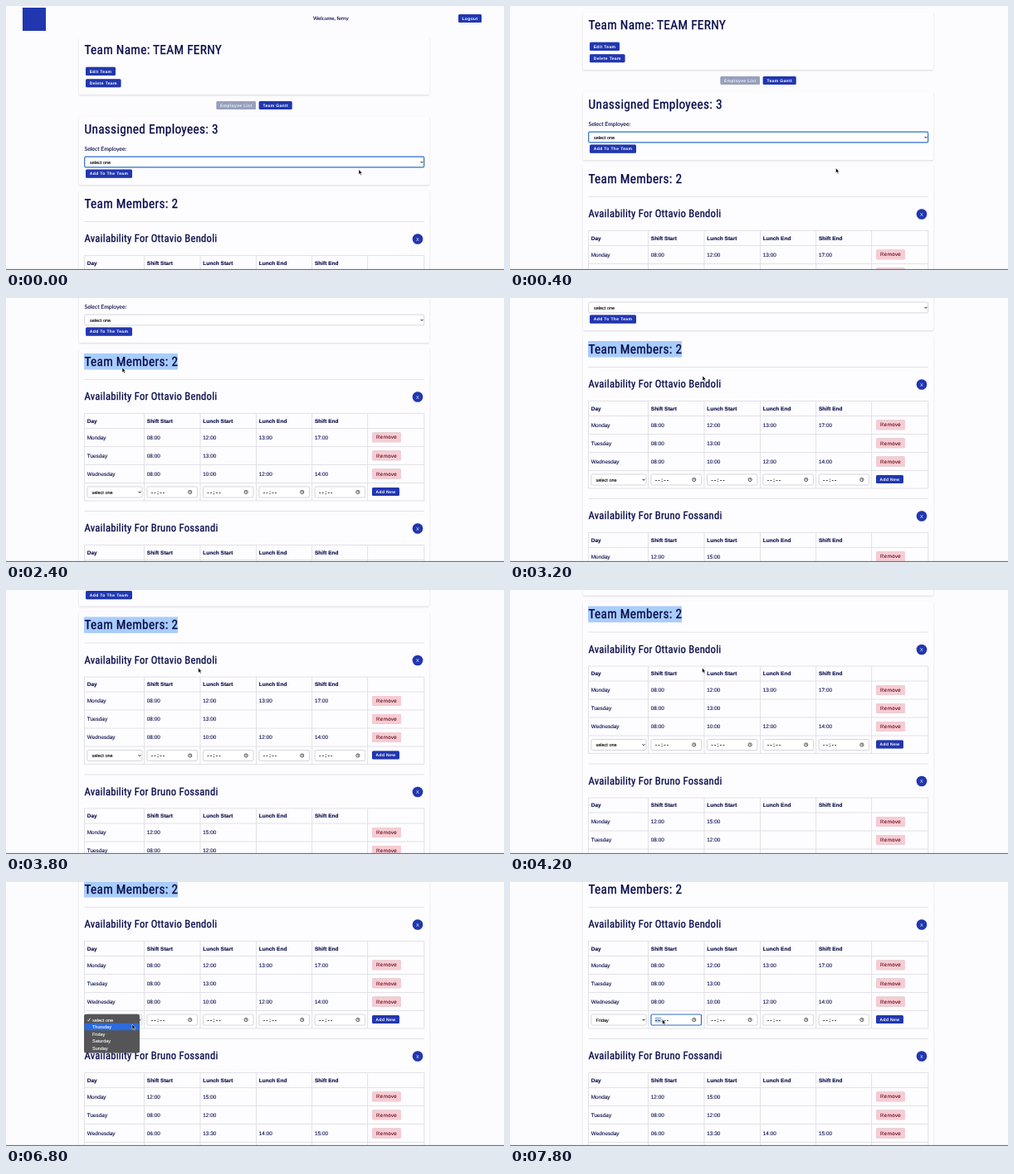
Recreate the animation shown at these times as an HTML page. Size 600 by 319 pixels, loop 8 s.

```html
<!DOCTYPE html>
<html lang="en">
<head>
<meta charset="utf-8">
<title>Team availability</title>
<style>
  html, body { margin: 0; width: 100%; height: 100%; overflow: hidden; background: #fcfbfe; }
  svg { display: block; width: 100%; height: 100%; }
  text { font-family: "Liberation Sans", Arial, sans-serif; fill: #060a48; stroke: #060a48; stroke-width: .1; text-rendering: geometricPrecision; white-space: pre; }
  .big, .mid { font-family: "Roboto Condensed", Roboto, sans-serif; font-stretch: condensed; letter-spacing: .018em; stroke-width: .28; }
  .big { font-size: 15.4px; }
  .mid { font-size: 12.7px; }
  .soft { font-family: Lato, sans-serif; font-size: 6.2px; }
  .head { font-size: 6.5px; font-weight: bold; }
  .cell { font-size: 6.4px; }
  .field { font-size: 5.5px; fill: #000; stroke: #000; stroke-width: .12; }
  .time { font-size: 6px; fill: #000; stroke: #000; stroke-width: .3; letter-spacing: 1.6px; }
  .btn { font-size: 5px; font-weight: bold; letter-spacing: .35px; fill: #fff; stroke: none; text-anchor: middle; }
  .remove { font-size: 6.2px; letter-spacing: .35px; fill: #6a1024; stroke: #6a1024; text-anchor: middle; }
  .menu { font-size: 5.5px; fill: #fff; stroke: #fff; }
  .card { fill: #fdfcff; filter: drop-shadow(0 1px .9px #0002); }
  .raised { filter: drop-shadow(0 .6px .7px #0004); }
  .rule { stroke: #dfdfe5; stroke-width: .9; fill: none; }
  .box { fill: #fff; stroke: #b9bdc9; stroke-width: .6; }
  .focus { stroke: #2f6fca; stroke-width: 1.2; }
  .line { fill: none; stroke: #111; stroke-width: 1; }
</style>
</head>
<body>
<script>
const BLUE = '#2137b0';
const COLUMNS = [94.5, 166.5, 234, 301.5, 368.7, 435.6, 503.8];
const TABLE_STEP = 159;

const text = (x, y, cls, str, extra = '') => `<text x="${x}" y="${y}" class="${cls}" ${extra}>${str}</text>`;
const rect = (x, y, w, h, attrs, r = 0) => `<rect x="${x}" y="${y}" width="${w}" height="${h}" rx="${r}" ${attrs}/>`;
const path = (d, cls) => `<path d="${d}" class="${cls}"/>`;
const rule = y => path(`M94.5 ${y}H504`, 'rule');
const chevron = (x, y) => path(`M${x - 1.5} ${y - .7}l1.5 1.5l1.5 -1.5`, 'line');
const card = (y, h) => rect(88, y, 422, h, 'class="card"', 1.5);

function button(x, y, w, label, fill = BLUE, ink = '#fff') {
  return rect(x, y, w, 10.1, `fill="${fill}" class="raised"`, 1.5) +
    text(x + w / 2, y + 6.8, 'btn', label, `style="fill:${ink}"`);
}

function timeField(x, y, editable) {
  return rect(x, y - 6.5, 60.5, 13, `class="box" ${editable ? 'id="timeBox"' : ''}`, 1.5) +
    (editable ? rect(x + 4.7, y - 3.4, 7.2, 6.6, 'fill="#a9cdfb" id="timeMark"') : '') +
    text(x + 5, y + 2, 'time', '--:--') +
    `<circle cx="${x + 51.7}" cy="${y}" r="2.1" class="line" style="stroke-width:.7"/>` +
    `<path d="M${x + 51.7} ${y - 1.2}v1.3h1" class="line" style="stroke-width:.6"/>`;
}

function availability(name, rows, offset, live) {
  const top = 301.5 + offset, bottom = 407 + offset;
  const lines = [301.5, 319.5, 341.5, 363.5, 385.5, 407].map(y => rule(y + offset)).join('');
  const posts = COLUMNS.map(x => path(`M${x} ${top}V${bottom}`, 'rule')).join('');
  const heads = ['Day', 'Shift Start', 'Lunch Start', 'Lunch End', 'Shift End']
    .map((label, i) => text(COLUMNS[i] + 3.3, 312.7 + offset, 'head', label)).join('');
  const cells = rows.map((row, r) => {
    const y = 330.2 + 22.1 * r + offset;
    return row.map((value, i) => text(COLUMNS[i] + 3.3, y + 2.3, 'cell', value)).join('') +
      rect(441, y - 5.8, 35, 11.8, 'fill="#f6ccd3" class="raised"', 1.5) +
      text(458.6, y + 2.2, 'remove', 'Remove');
  }).join('');
  const y = 396.5 + offset;
  return rule(260.5 + offset) + text(94.5, 285.4 + offset, 'mid', `Availability For ${name}`) +
    `<circle cx="496" cy="${281.5 + offset}" r="6.3" fill="${BLUE}" class="raised"/>` +
    text(496, 283.5 + offset, 'btn', 'X', 'style="font-weight:400;font-size:5.6px"') +
    lines + posts + heads + cells +
    rect(98, y - 6.5, 66, 13, 'class="box"', 1.5) +
    text(103.5, y + 2, 'field', 'select one', live ? 'id="day"' : '') + chevron(161, y) +
    [1, 2, 3, 4].map(i => timeField(COLUMNS[i] + 3.5, y, live && i === 1)).join('') +
    button(441, y - 5.5, 33, 'Add New');
}

const page =
  rect(20, 2, 28, 28, `fill="${BLUE}"`) +
  text(370, 17.2, 'soft', 'Welcome, ferny') + button(545, 10, 28, 'Logout') +
  card(38, 69) + text(94.5, 58.3, 'big', 'Team Name: TEAM FERNY') +
  button(96, 73.8, 36, 'Edit Team') + button(96, 88.2, 42.5, 'Delete Team') +
  button(253.5, 115, 47.5, 'Employee List', '#97a0bd', '#e9ebf4') + button(304.7, 115, 40, 'Team Gantt') +
  card(134, 82) + text(94.5, 154.3, 'big', 'Unassigned Employees: 3') +
  text(94.5, 175.3, 'soft', 'Select Employee:', 'style="font-size:6.8px"') +
  rect(94.7, 182.1, 409, 12.8, 'id="employee" class="box"', 1.5) +
  text(101, 190.6, 'field', 'select one') + chevron(501, 188.6) +
  button(96, 197.6, 56, 'Add To The Team') +
  card(223, 420) + rect(94, 229, 113, 19.6, 'fill="#a9cdfb" id="marked"') +
  text(94.5, 243.7, 'big', 'Team Members: 2') +
  availability('Ottavio Bendoli', [
    ['Monday', '08:00', '12:00', '13:00', '17:00'],
    ['Tuesday', '08:00', '13:00'],
    ['Wednesday', '08:00', '10:00', '12:00', '14:00']], 0, true) +
  availability('Bruno Fossandi', [
    ['Monday', '12:00', '15:00'],
    ['Tuesday', '08:00', '12:00'],
    ['Wednesday', '06:00', '13:30', '14:00', '15:00']], TABLE_STEP, false);

const menu = rect(94, 159.7, 67, 46.8, 'fill="#555558" class="raised"', 2.5) +
  rect(94.6, 0, 65.8, 8.5, 'fill="#2c6be0" id="hover"') +
  '<path d="M98.3 166.6l1.2 1.5l2 -3.6" class="line" style="stroke:#fff;stroke-width:.8"/>' +
  ['select one', 'Thursday', 'Friday', 'Saturday', 'Sunday']
    .map((label, i) => text(104, 168.5 + 8.5 * i, 'menu', label)).join('');

document.body.innerHTML = `<svg viewBox="0 0 600 319">
  <rect width="600" height="319" fill="#fcfbfe"/>
  <g id="page">${page}</g>
  <g id="menu">${menu}</g>
  <rect y="317.9" width="600" height="1.1" fill="#6f6f76"/>
  <path id="cursor" d="M0 0V6L1.4 4.8L2.4 7L3.4 6.5L2.4 4.4H4.2Z" fill="#000" stroke="#fff" stroke-width=".5"/>
</svg>`;

const $ = id => document.getElementById(id);
const show = (id, on) => $(id).setAttribute('visibility', on ? 'visible' : 'hidden');

const scrollKeys = [[200, 0], [400, 30], [600, 90], [800, 140], [1000, 161.5], [1400, 162],
  [2600, 162], [3200, 177], [3600, 190], [4200, 209.5], [4800, 230]];
const cursorKeys = [[200, 425, 197.5], [600, 360, 194], [1000, 321.5, 190], [1400, 270, 130],
  [1600, 207, 78], [2200, 90, 78], [2600, 190, 90], [3200, 232, 94], [4200, 231.5, 94],
  [4800, 234, 104.5], [5200, 225, 120], [5800, 160, 164], [6400, 158, 164], [6800, 152, 172],
  [7000, 145, 181], [7200, 143, 181], [7400, 145, 180], [7600, 172, 167], [7800, 183.5, 166]];

function along(keys, t) {
  const next = keys.findIndex(key => key[0] > t);
  if (next < 0) return keys.at(-1).slice(1);
  if (next === 0) return keys[0].slice(1);
  const a = keys[next - 1], b = keys[next], k = (t - a[0]) / (b[0] - a[0]);
  return a.slice(1).map((v, i) => v + (b[i + 1] - v) * k);
}

function draw(now) {
  const t = Math.floor(now % 8000 / 200) * 200;
  const [scroll] = along(scrollKeys, t);
  const [x, y] = along(cursorKeys, t);
  $('page').setAttribute('transform', `translate(0 ${-scroll})`);
  $('cursor').setAttribute('transform', `translate(${x} ${y})`);

  const left = t < 2200 ? Math.max(94, x) : 94;
  show('marked', t > 1600 && t < 7600);
  $('marked').setAttribute('x', left);
  $('marked').setAttribute('width', Math.max(0, 207 - left));
  $('employee').classList.toggle('focus', t < 1600);

  const open = t >= 6400 && t < 7400;
  const item = Math.max(0, Math.min(4, Math.floor((y - 162) / 8.5)));
  show('menu', open);
  $('hover').setAttribute('y', 162.2 + 8.5 * item);
  $('day').textContent = t < 7400 ? 'select one' : 'Friday';

  const editing = t >= 7600;
  $('timeBox').classList.toggle('focus', editing);
  show('timeMark', editing);
  requestAnimationFrame(() => draw(performance.now() - start));
}

const start = performance.now();
draw(0);
</script>
</body>
</html>
```
